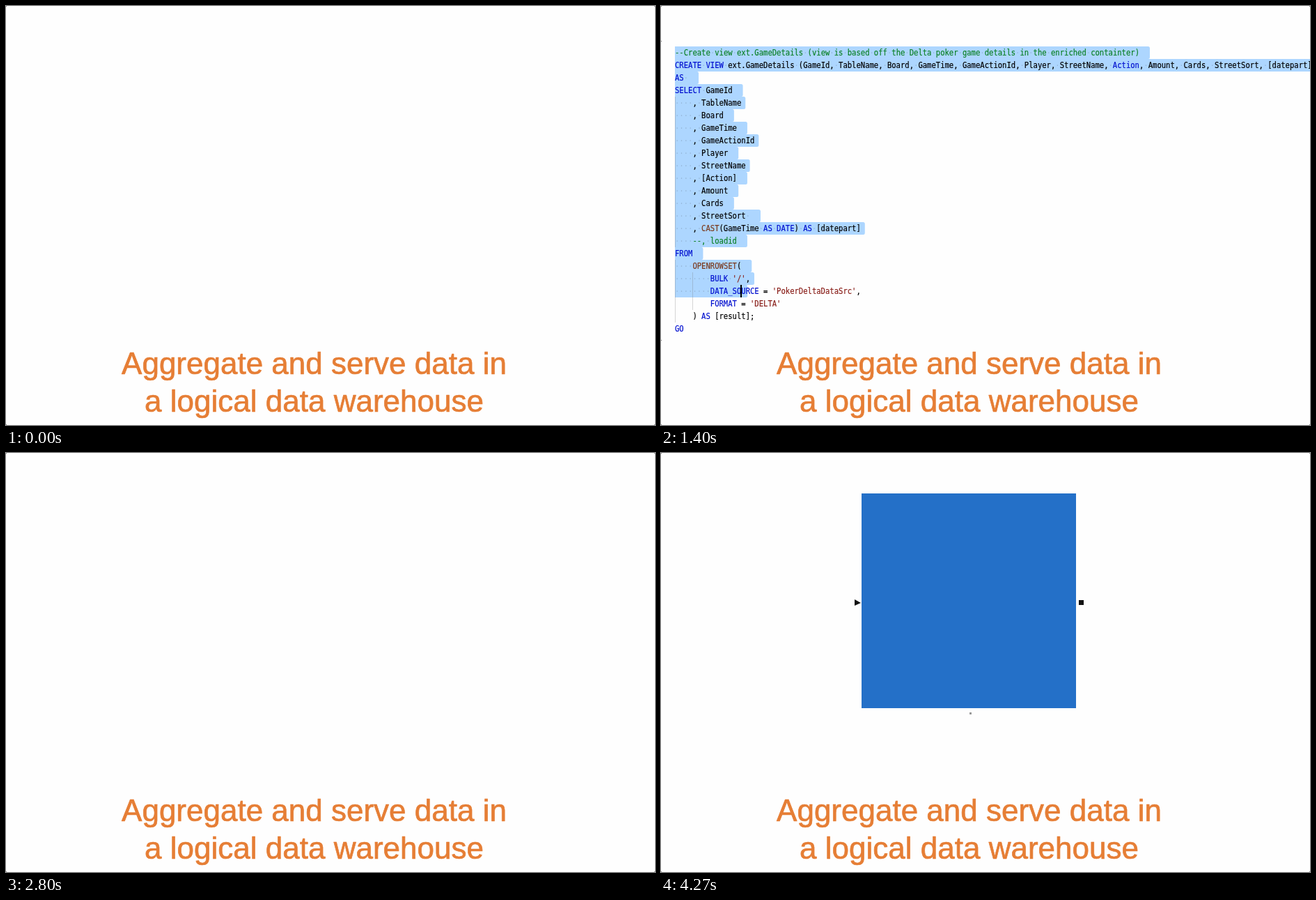
Recreate the animation shown at these times as an HTML page with a canvas. Size 932 by 601 pixels, loop 4340 ms.

```html
<!DOCTYPE html>
<html lang="en">
<head>
<meta charset="utf-8">
<title>Logical data warehouse</title>
<style>
  html, body { margin: 0; width: 100%; height: 100%; overflow: hidden; background: #fefefe; }
  canvas { display: block; }
</style>
</head>
<body>
<canvas id="stage" width="932" height="601"></canvas>
<script>
const W = 932, H = 601, LOOP = 4340, STEP = 70;
const LEFT = 20, TOP = 58, ROW = 18, SQUEEZE = 0.8793;
const COL = 7.224 * SQUEEZE, NEWLINE = 6, INNER = 9;
const BLUE = '#0010cf', GREEN = '#0b8024', BROWN = '#7b3a1c', RED = '#8a201b';

const lines = [
  '--Create view ext.GameDetails (view is based off the Delta poker game details in the enriched containter)',
  'CREATE VIEW ext.GameDetails (GameId, TableName, Board, GameTime, GameActionId, Player, StreetName, Action, Amount, Cards, StreetSort, [datepart])',
  'AS ',
  'SELECT GameId',
  '    , TableName',
  '    , Board',
  '    , GameTime',
  '    , GameActionId',
  '    , Player',
  '    , StreetName',
  '    , [Action]',
  '    , Amount',
  '    , Cards',
  '    , StreetSort ',
  '    , CAST(GameTime AS DATE) AS [datepart]',
  '    --, loadid',
  'FROM',
  '    OPENROWSET(',
  "        BULK '/',",
  "        DATA_SOURCE = 'PokerDeltaDataSrc',",
  "        FORMAT = 'DELTA'",
  '    ) AS [result];',
  'GO    '
];

// Where the selection ends: time, row, column
const selection = [
  [0, 3, 9], [630, 6, 10], [700, 9, 11], [770, 12, 11], [840, 14, 12],
  [910, 16, 4], [980, 18, 16], [1190, 19, 14], [1260, 19, 15],
  [1540, 20, 15], [1610, 20, 24], [1750, 21, 18], [1820, 22, 6]
];

const syntax = [
  [/--.*/g, GREEN],
  [/'[^']*'/g, RED],
  [/\b(CAST|OPENROWSET)\b/g, BROWN],
  [/(?<!\[)\b(CREATE|VIEW|AS|SELECT|Action|DATE|FROM|BULK|DATA_SOURCE|FORMAT|GO)\b/g, BLUE]
];

const ctx = document.getElementById('stage').getContext('2d');

function makeLayer() {
  const c = document.createElement('canvas');
  c.width = W;
  c.height = H;
  return c.getContext('2d', { willReadFrequently: true });
}
const layer = makeLayer();

// Seeded grain: one threshold per pixel, mostly in 2px clusters
const grain = (() => {
  let seed = 20;
  const random = () => (seed = (seed * 1664525 + 1013904223) >>> 0) / 4294967296;
  const cells = Float32Array.from({ length: W * H }, random);
  return cells.map((v, i) => {
    const x = i % W, y = (i - x) / W;
    return v < 0.15 ? v / 0.15 : cells[(y >> 1) * W + (x >> 1)];
  });
})();

function dissolve(g, amount) {
  const image = g.getImageData(0, 0, W, H);
  for (let i = 0; i < grain.length; i++) {
    if (grain[i] >= amount) image.data[i * 4 + 3] = 0;
  }
  g.putImageData(image, 0, 0);
}

// Text with a thin outline for a slightly heavier weight
function drawText(g, text, x, y, color, weight) {
  g.fillStyle = g.strokeStyle = color;
  g.lineWidth = weight;
  g.lineJoin = 'round';
  g.fillText(text, x, y);
  g.strokeText(text, x, y);
}

function colorRuns(line) {
  const colors = Array(line.length).fill('#000');
  for (const [pattern, color] of [...syntax].reverse()) {
    for (const m of line.matchAll(pattern)) colors.fill(color, m.index, m.index + m[0].length);
  }
  const runs = [];
  for (let col = 0; col < line.length; col++) {
    const last = runs[runs.length - 1];
    if (last && last.color === colors[col]) last.text += line[col];
    else runs.push({ col, color: colors[col], text: line[col] });
  }
  return runs;
}
const colored = lines.map(colorRuns);

function drawSelection(g, endRow, endCol) {
  const edge = r => r < 0 || r > endRow ? 0
    : LEFT + (r === endRow ? endCol * COL : lines[r].length * COL + NEWLINE);
  for (let r = 0; r <= endRow; r++) {
    const inner = Math.max(edge(r - 1), edge(r + 1)) > edge(r) + 1 ? INNER : 0;
    g.fillStyle = '#add6ff';
    g.beginPath();
    g.roundRect(LEFT, TOP + r * ROW, edge(r) + inner - LEFT, ROW, [0, 2.5, 2.5, 0]);
    g.fill();
    const limit = r === endRow ? endCol : lines[r].length;
    g.fillStyle = 'rgba(51,51,51,.27)';
    for (let c = 0; c < limit; c++) {
      if (lines[r][c] === ' ') g.fillRect(LEFT + (c + 0.4) * COL, TOP + r * ROW + 8.5, 1.2, 1.2);
    }
  }
}

function drawCode(g, t) {
  const [, row, col] = selection.findLast(s => s[0] <= t);
  drawSelection(g, row, col);

  g.fillStyle = 'rgba(120,120,120,.3)';
  for (const [level, from, to] of [[0, 4, 15], [0, 17, 21], [4, 18, 20]]) {
    g.fillRect(Math.round(LEFT + level * COL), TOP + from * ROW, 1, (to - from + 1) * ROW);
  }

  g.save();
  g.translate(LEFT, 71.3);
  g.scale(SQUEEZE, 1);
  g.font = '12px "DejaVu Sans Mono", monospace';
  colored.forEach((runs, r) => {
    for (const run of runs) drawText(g, run.text, run.col * COL / SQUEEZE, r * ROW, run.color, 0.2);
  });
  g.restore();

  g.fillStyle = '#000';
  if (t < 2380) g.fillRect(Math.round(LEFT + col * COL) - 1, TOP + row * ROW, 2, ROW);
  g.fillStyle = '#777';
  g.fillRect(0, 50, 1, 1);
  g.fillRect(0, 479, 1, 1);
}

function drawEmblem(g) {
  g.fillStyle = '#2470c8';
  g.fillRect(288, 58, 308, 308);
  g.fillStyle = '#111';
  g.beginPath();
  g.moveTo(278, 210);
  g.lineTo(287, 215);
  g.lineTo(278, 219);
  g.fill();
  g.fillRect(600, 211, 7, 7);
  g.fillStyle = '#999';
  g.fillRect(443, 372, 3, 3);
}

function drawCaption() {
  ctx.font = '44px "Liberation Sans", Arial, sans-serif';
  ctx.textAlign = 'center';
  drawText(ctx, 'Aggregate and serve data in', 442.5, 528, '#e67e35', 0.7);
  drawText(ctx, 'a logical data warehouse', 442.5, 582, '#e67e35', 0.7);
}

function drawStage(t) {
  ctx.fillStyle = '#fefefe';
  ctx.fillRect(0, 0, W, H);
  ctx.fillStyle = '#888';
  for (const x of [0, W - 1]) for (const y of [0, H - 1]) ctx.fillRect(x, y, 1, 1);

  const scene = t >= 70 && t < 2730 ? { draw: drawCode, start: 70 }
    : t >= 3780 ? { draw: drawEmblem, start: 3780 } : null;
  if (scene) {
    layer.clearRect(0, 0, W, H);
    scene.draw(layer, t);
    const amount = ((t - scene.start) / STEP + 1) / 8;
    if (amount < 1) dissolve(layer, amount);
    ctx.drawImage(layer.canvas, 0, 0);
  }
  drawCaption();
}

const begin = performance.now();
let shown = -1;
function tick() {
  const t = Math.floor(((performance.now() - begin) % LOOP) / STEP) * STEP;
  if (t !== shown) drawStage(shown = t);
  requestAnimationFrame(tick);
}
tick();
</script>
</body>
</html>
```
